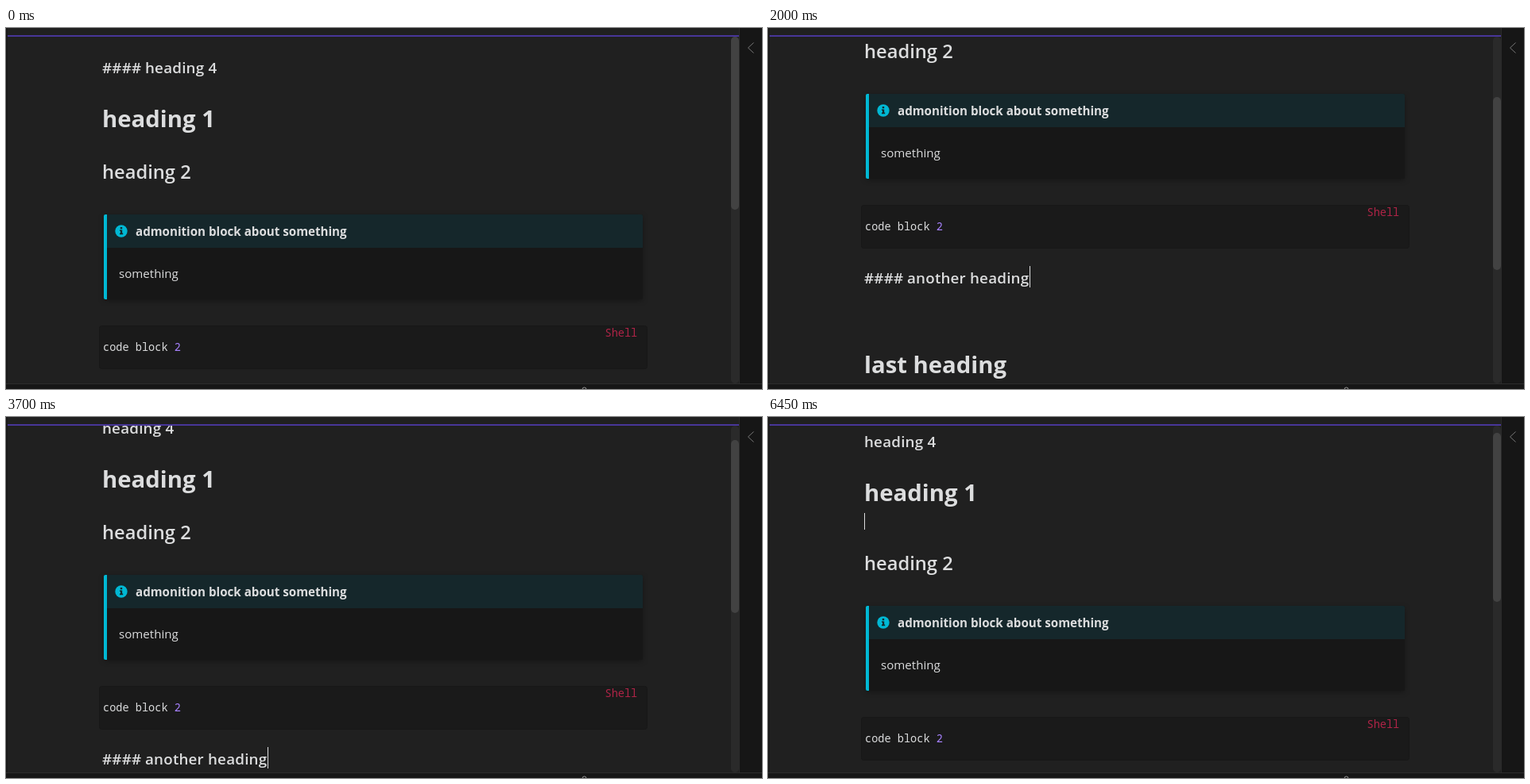
These frames come from a looping animation (951 px wide and 455 px high, 6800 ms). An HTML page:

```html
<!DOCTYPE html>
<html lang="en">
<head>
<meta charset="utf-8">
<title>Heading navigation</title>
<style>
  html, body { margin: 0; width: 100%; height: 100%; overflow: hidden; background: #202020; }
  svg { display: block; }
  text { font-family: "Open Sans", "Noto Sans", sans-serif; fill: #dcddde; white-space: pre; }
  .h1 { font-size: 29.3px; font-weight: 700; }
  .h2 { font-size: 23.7px; font-weight: 600; }
  .h4 { font-size: 18.8px; font-weight: 600; letter-spacing: .2px; }
  .title { font-size: 15.15px; font-weight: 700; }
  .body { font-size: 15.1px; }
  .code { font-family: "Noto Sans Mono", monospace; font-size: 13.6px; }
  .shadow { filter: drop-shadow(0 2px 3px rgba(0, 0, 0, .3)); }
</style>
</head>
<body>
<svg width="951" height="455" viewBox="0 0 951 455">
  <defs><clipPath id="view"><rect y="11" width="922" height="437"/></clipPath></defs>
  <rect width="951" height="455" fill="#202020"/>
  <rect width="2" height="448" fill="#191919"/>

  <g clip-path="url(#view)">
    <g id="page">
      <g id="top"></g>
      <g id="rest">
        <g class="shadow">
          <rect x="123" y="235" width="678" height="107" rx="2" fill="#171717"/>
        </g>
        <path d="M127 235h672a2 2 0 0 1 2 2v40h-674z" fill="#15272b"/>
        <path d="M127 235v107h-2a2 2 0 0 1-2-2v-103a2 2 0 0 1 2-2z" fill="#00b8d4"/>
        <circle cx="145" cy="256" r="7.7" fill="#00b8d4"/>
        <path d="M143.8 251h2.4v2.2h-2.4zM143 254.4h3.2v4.2h1v1.6h-4.2v-1.6h1v-2.6h-1z" fill="#15272b"/>
        <text class="title" x="163" y="262">admonition block about something</text>
        <text class="body" x="142" y="315">something</text>
        <rect x="117.5" y="375.5" width="689" height="54" rx="3" fill="#1a1a1a" stroke="#171717"/>
        <text class="code" x="122" y="407">code block <tspan fill="#a882ff">2</tspan></text>
        <text class="code" x="753.5" y="389" style="fill:#b02447">Shell</text>
      </g>
      <rect id="caret" width="1" fill="#dcddde"/>
    </g>
  </g>

  <rect x="912" y="11" width="10" height="437" rx="5" fill="#2a2a2a"/>
  <rect id="thumb" x="912" width="10" rx="5" fill="#424242"/>
  <rect x="2" y="9" width="920" height="2" fill="#483699"/>
  <rect x="922" width="29" height="455" fill="#161616"/>
  <rect x="922" width="1" height="448" fill="#2a2a2a"/>
  <rect y="448" width="951" height="7" fill="#161616"/>
  <rect y="448" width="951" height="1" fill="#2c2c2c"/>
  <path d="M940.5 18.5l-7 6.5 7 6.5" fill="none" stroke="#777"/>
  <path d="M725 455.5q0-2.5 2.5-2.5t2.5 2.5" fill="none" stroke="#999"/>
</svg>
<script>
const LOOP = 6800, LEFT = 121, LINE = 22;
const $ = id => document.getElementById(id);

// level, title, baseline, marker width, caret x / top / height
const rows = [
  [4, 'heading 4', 57, 54, 270, 35, 27],
  [1, 'heading 1', 125, 27, 292, 90, 43],
  [2, 'heading 2', 190, 36, 269, 162, 34],
  [4, 'another heading', 474, 54, 329, 452, 27],
  [1, 'last heading', 587, 27, 326, 552, 43]
];
const BLANK = rows.length;

// start time, scroll offset, current row, caret visible
const steps = [
  [0, 0, 0, 0], [600, 0, 1, 1], [950, 0, 2, 1],
  [1150, 36, 3, 1], [1300, 152, 4, 1], [1950, 152, 4, 0],
  [2000, 152, 3, 1], [2300, 146, 2, 1], [2550, 74, 1, 1],
  [2700, 19, 0, 1], [3250, 19, 1, 1], [3500, 19, 2, 1],
  [3700, 36, 3, 1], [4050, 36, 2, 1], [4250, 36, 1, 1],
  [4450, 19, 0, 1], [4800, 19, 1, 1],
  [5250, 19, BLANK, 1], [5850, 19, BLANK, 0], [6450, 19, BLANK, 1]
];

function set(el, attrs) {
  for (const name in attrs) el.setAttribute(name, attrs[name]);
  return el;
}

function addText(parent, level, text, y) {
  const el = document.createElementNS('http://www.w3.org/2000/svg', 'text');
  el.textContent = text;
  return parent.appendChild(set(el, { class: 'h' + level, x: LEFT, y }));
}

const heads = rows.map(([level, title, y], i) => {
  const parent = $(i < 2 ? 'top' : 'rest');
  return { mark: addText(parent, level, '#'.repeat(level), y), label: addText(parent, level, title, y) };
});

function show([, scroll, row, caretOn]) {
  const blank = row === BLANK;
  heads.forEach(({ mark, label }, i) => {
    const active = i === row;
    set(mark, { visibility: active ? 'visible' : 'hidden' });
    set(label, { x: LEFT + (active ? rows[i][3] : 0) });
  });
  const [x, y, height] = blank ? [LEFT, 140, 21] : rows[row].slice(4);
  set($('caret'), { x, y, height, visibility: caretOn ? 'visible' : 'hidden' });
  set($('page'), { transform: `translate(0 ${-scroll})` });
  set($('rest'), { transform: `translate(0 ${blank ? LINE : 0})` });
  set($('thumb'), { y: 11 + Math.floor(scroll / 2), height: blank ? 213 : 218 });
}

const start = performance.now();
let current;

function tick() {
  const t = (performance.now() - start) % LOOP;
  const step = steps.findLast(s => s[0] <= t);
  if (step !== current) show(current = step);
  requestAnimationFrame(tick);
}
tick();
</script>
</body>
</html>
```
